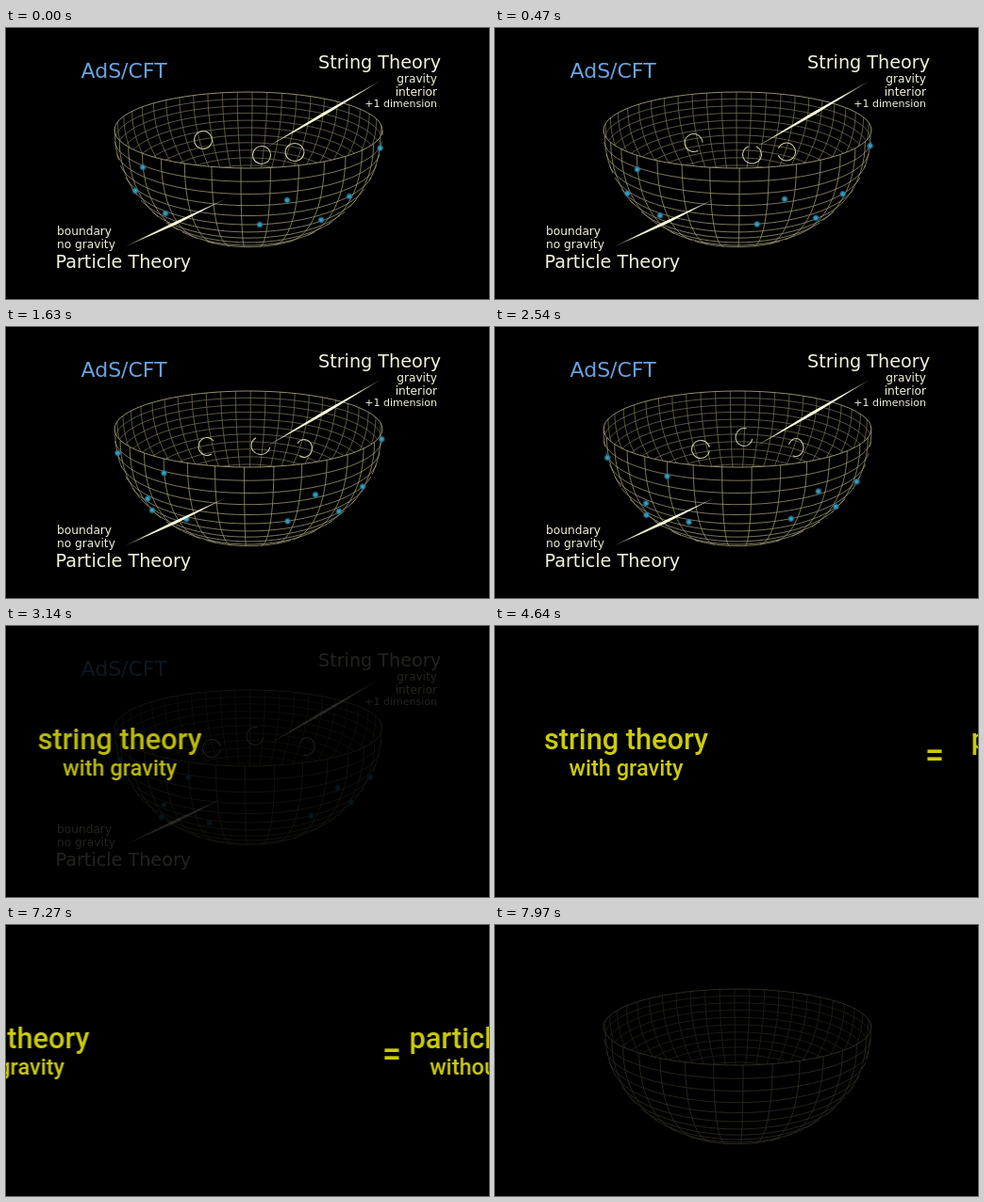
An HTML page with a canvas that plays this animation: 512x288 px, repeating every 8000 ms.

```html
<!DOCTYPE html>
<html lang="en">
<head>
<meta charset="utf-8">
<title>Bowl and theories</title>
<style>
  html, body { margin: 0; width: 100%; height: 100%; overflow: hidden; background: #000; }
  canvas, svg { position: absolute; left: 0; top: 0; width: 512px; height: 288px; overflow: hidden; }
  canvas { animation: bowl 8s linear infinite; }
  .labels { font: 12.2px "DejaVu Sans", sans-serif; fill: #f4f2dc; animation: labels 8s linear infinite; }
  .title { font-size: 19.2px; }
  .right { text-anchor: end; }
  .equation { font: 500 30.7px Roboto, sans-serif; fill: #cccc08; text-anchor: middle; }
  .sub { font-size: 23.5px; }
  .left { animation: left 8s infinite; }
  .equals { font-size: 36px; animation: equals 8s infinite; }
  .particle { animation: particle 8s infinite; }

  @keyframes bowl {
    0%, 31.75% { opacity: 1; }
    40.5%, 93.75% { opacity: 0; }
    100% { opacity: .32; }
  }
  @keyframes labels {
    0%, 31.75% { opacity: 1; }
    40.5%, 100% { opacity: 0; }
  }
  @keyframes left {
    0%, 31.75% { transform: translateX(-230px); opacity: 0; animation-timing-function: ease-out; }
    41.5%, 83.75% { transform: none; opacity: 1; animation-timing-function: ease-in; }
    93.75%, 100% { transform: translateX(-240px); opacity: 1; }
  }
  @keyframes equals {
    0%, 57.2% { transform: translateX(284px); animation-timing-function: cubic-bezier(.215, .61, .355, 1); }
    67.2%, 83.75% { transform: none; animation-timing-function: ease-in; }
    93.75%, 100% { transform: translateX(284px); }
  }
  @keyframes particle {
    0%, 56.875% { transform: translateX(250px); animation-timing-function: cubic-bezier(.37, 0, .63, 1); }
    65.625%, 83.75% { transform: none; animation-timing-function: ease-in; }
    93.75%, 100% { transform: translateX(284px); }
  }
</style>
</head>
<body>
<canvas width="512" height="288"></canvas>
<svg viewBox="0 0 512 288">
  <defs>
    <linearGradient id="beam">
      <stop offset="0" stop-color="#f6f4d0" stop-opacity=".4"/>
      <stop offset=".25" stop-color="#f6f4d0"/>
      <stop offset=".75" stop-color="#fffde4"/>
      <stop offset="1" stop-color="#f6f4d0" stop-opacity=".4"/>
    </linearGradient>
  </defs>
  <g class="labels">
    <path fill="url(#beam)" d="M273.500 128.500L337 89.500L398 55.500L339 92Z"/>
    <path fill="url(#beam)" d="M126 232.500L179 206L233 181.500L181 208.500Z"/>
    <text x="79.500" y="53" font-size="22" fill="#6aa2de">AdS/CFT</text>
    <g class="right">
      <text class="title" x="461" y="42.500">String Theory</text>
      <text x="457" y="58">gravity</text>
      <text x="457" y="71.500">interior</text>
      <text x="457" y="83.500" font-size="11">+1 dimension</text>
    </g>
    <text x="54" y="220">boundary</text>
    <text x="54" y="234">no gravity</text>
    <text class="title" x="52.500" y="255">Particle Theory</text>
  </g>
  <g class="equation">
    <g class="left">
      <text x="139" y="131">string theory</text>
      <text class="sub" x="139" y="158.500">with gravity</text>
    </g>
    <text class="equals" x="246" y="149">=</text>
    <g class="particle">
      <text x="364" y="131">particle theory</text>
      <text class="sub" x="364" y="158.500">without gravity</text>
    </g>
  </g>
</svg>
<script>
const ctx = document.querySelector('canvas').getContext('2d');
const { PI, sin, cos, sqrt, atan2, asin, max, min } = Math;
const RAD = PI / 180, LOOP = 8, SPIN = 6.15 * RAD;
const CX = 257, CY = 95, WIDE = 134, LEAN = 36, DEEP = 111, PERSP = 1 / 3;

// Unit hemisphere: lon 0 faces the viewer, lat grows downwards from the rim.
function project(lon, lat) {
  const x = cos(lat) * sin(lon), y = cos(lat) * cos(lon), z = sin(lat);
  const w = 1 - PERSP * y;
  return {
    x: CX + WIDE * x / w,
    y: CY + (LEAN * y + DEEP * z) / w,
    facing: y / PERSP - z * LEAN / (PERSP * DEEP) - 1
  };
}

// Finds the near point of the sphere under a screen position.
function unproject(sx, sy) {
  const p = (sx - CX) / WIDE, q = (sy - CY + LEAN / PERSP) / DEEP;
  const r = LEAN / (PERSP * DEEP), d = 1 / PERSP;
  const a = p * p + d * d + q * q, b = d * d + q * r, c = d * d + r * r - 1;
  const w = (b - sqrt(max(0, b * b - a * c))) / a;
  const z = q * w - r;
  return { lon: atan2(p * w, d * (1 - w)), lat: asin(max(-1, min(1, z))) };
}

// Screen x, y and the second at which the dot is there.
const dots = [
  [145, 148, 0], [137, 173, 0], [160, 200, 2.54], [169, 197, 0], [269, 209, 0],
  [298, 183, 0], [364, 179, 0], [353, 196, 1.63], [400, 123, .93], [119, 139, 2.54]
].map(([x, y, t]) => {
  const p = unproject(x, y);
  return { lon: p.lon - SPIN * t, lat: p.lat };
});

// Each pose: x, y, horizontal radius, middle angle, sweep.
const ringTimes = [0, .93, 1.63, 2.54];
const rings = [
  [[209, 119, 9.5, 3.6, 6.28], [212, 125, 9.5, 3.7, 4.2], [213, 127, 9, 3.3, 4.6], [218, 130, 9.5, 3.1, 5.9]],
  [[271, 135, 9.5, 1.6, 6.28], [274, 134, 10.5, 1.6, 4.6], [270, 126, 10, 2.2, 4], [264, 117, 9, 2.6, 4.8]],
  [[306, 132, 10, 0, 6.28], [312, 131, 9, 0, 4.7], [316, 129, 8.5, -.2, 4.7], [319, 128, 8, -.4, 4.8]]
];

function ringPose(poses, t) {
  let i = 0;
  while (i < 2 && t > ringTimes[i + 1]) i++;
  const u = min(1, (t - ringTimes[i]) / (ringTimes[i + 1] - ringTimes[i]));
  return poses[i].map((v, k) => v + (poses[i + 1][k] - v) * u);
}

function traceCurve(at, steps, front) {
  let drawing = false;
  for (let i = 0; i <= steps; i++) {
    const p = at(i / steps);
    const seen = front ? p.facing >= 0 : p.facing <= 0;
    if (seen) drawing ? ctx.lineTo(p.x, p.y) : ctx.moveTo(p.x, p.y);
    drawing = seen;
  }
}

function rimPath() {
  ctx.beginPath();
  ctx.ellipse(CX, 108.5, 142, 40.5, 0, 0, 2 * PI);
}

function drawGrid(turn, front) {
  ctx.beginPath();
  for (let i = 0; i < 40; i++) {
    const lon = turn + i * 9 * RAD;
    traceCurve(u => project(lon, u * 85 * RAD), 80, front);
  }
  for (let lat = 5; lat < 90; lat += 5) {
    traceCurve(u => project(u * 2 * PI, lat * RAD), 360, front);
  }
  ctx.lineWidth = .8;
  ctx.strokeStyle = front ? '#a09a78' : '#787258';
  ctx.stroke();
}

function drawDot(p) {
  const glow = ctx.createRadialGradient(p.x, p.y, 0, p.x, p.y, 4.2);
  glow.addColorStop(0, '#48aacc');
  glow.addColorStop(.5, '#2a84a4');
  glow.addColorStop(1, '#18506800');
  ctx.fillStyle = glow;
  ctx.fillRect(p.x - 5, p.y - 5, 10, 10);
}

function draw(t) {
  ctx.clearRect(0, 0, 512, 288);
  const turn = SPIN * t - 2.3 * RAD;

  ctx.save();
  rimPath();
  ctx.clip();
  drawGrid(turn, false);
  ctx.restore();

  drawGrid(turn, true);
  rimPath();
  ctx.lineWidth = .9;
  ctx.strokeStyle = '#a49e7c';
  ctx.stroke();

  if (t > 5) return;
  ctx.lineWidth = 1.1;
  ctx.strokeStyle = '#ccc8a4';
  for (const poses of rings) {
    const [x, y, rx, mid, sweep] = ringPose(poses, t);
    ctx.beginPath();
    ctx.ellipse(x, y, rx, 9.5, 0, mid - sweep / 2, mid + sweep / 2);
    ctx.stroke();
  }
  for (const { lon, lat } of dots) {
    const p = project(lon + SPIN * t, lat);
    if (p.facing > -.3) drawDot(p);
  }
}

function tick() {
  draw(performance.now() / 1000 % LOOP);
  requestAnimationFrame(tick);
}
tick();
</script>
</body>
</html>
```
